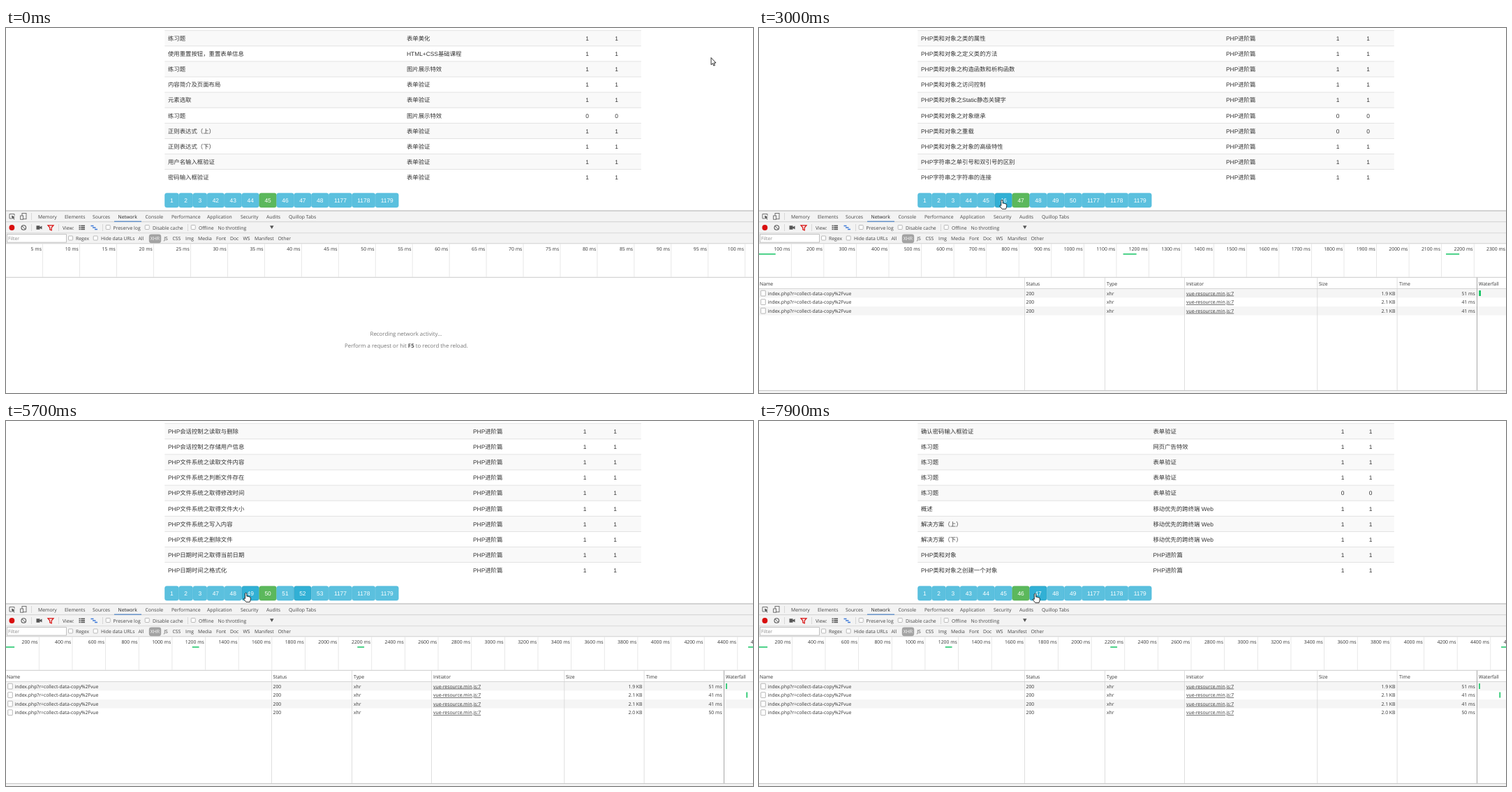
These frames come from a looping animation (1070 by 523 pixels, 8 s). An HTML page:

```html
<!DOCTYPE html>
<html lang="zh-CN">
<head>
<meta charset="utf-8">
<title>Pagination with cached requests</title>
<style>
html, body { margin: 0; width: 100%; height: 100%; overflow: hidden; background: #fff; }
svg { display: block; width: 1070px; height: 523px; text-rendering: geometricPrecision; }
.page { font: 8.4px "Liberation Sans", "Noto Sans CJK SC", "Noto Sans CJK", sans-serif; fill: #333; }
.tools { font: 6.85px "Open Sans", "Noto Sans", sans-serif; fill: #333; }
.mid { text-anchor: middle; }
.end { text-anchor: end; }
.hint { font-size: 7.9px; fill: #777; }
</style>
</head>
<body>
<svg id="stage" viewBox="0 0 1070 523" xmlns="http://www.w3.org/2000/svg"></svg>
<script>
const LOOP = 8000, TICK = 100;
const stage = document.getElementById('stage');

function el(parent, tag, attrs = {}, text) {
  const node = document.createElementNS('http://www.w3.org/2000/svg', tag);
  for (const key in attrs) node.setAttribute(key, attrs[key]);
  if (text !== undefined) node.textContent = text;
  parent.appendChild(node);
  return node;
}
const group = (parent, cls = '') => el(parent, 'g', { class: cls });
const rect = (g, x, y, width, height, fill, more) => el(g, 'rect', { x, y, width, height, fill, ...more });
const label = (g, x, y, text, more) => el(g, 'text', { x, y, ...more }, text);
const path = (g, d, more) => el(g, 'path', { d, fill: 'none', ...more });
const show = (node, on) => node.setAttribute('display', on ? 'inline' : 'none');

// Course list
const same = (text, n = 10) => Array(n).fill(text).join('|');
const PHP = { cols: [669, 829, 872.5], cats: same('PHP进阶篇') };
const strings = { ...PHP, zero: [],
  titles: 'PHP字符串之去除字符串首尾的空格|PHP字符串之获取字符串的长度|PHP字符串之字符串的截取|PHP字符串之查找字符串|PHP字符串之替换字符串|PHP字符串之格式化字符串|PHP字符串之字符串的合并与分割|PHP字符串之字符串的转义|什么叫正则表达式|正则表达式的基本语法' };
const PAGES = {
  45: { cols: [574, 832.5, 874.5], zero: [5],
    titles: '练习题|使用重置按钮，重置表单信息|练习题|内容简介及页面布局|元素选取|练习题|正则表达式（上）|正则表达式（下）|用户名输入框验证|密码输入框验证',
    cats: '表单美化|HTML+CSS基础课程|图片展示特效|表单验证|表单验证|图片展示特效|' + same('表单验证', 4) },
  46: { cols: [564.5, 836, 876], zero: [4],
    titles: '确认密码输入框验证|练习题|练习题|练习题|练习题|概述|解决方案（上）|解决方案（下）|PHP类和对象|PHP类和对象之创建一个对象',
    cats: '表单验证|网页广告特效|' + same('表单验证', 3) + '|' + same('移动优先的跨终端 Web', 3) + '|' + same('PHP进阶篇', 2) },
  47: { ...PHP, zero: [5, 6],
    titles: 'PHP类和对象之类的属性|PHP类和对象之定义类的方法|PHP类和对象之构造函数和析构函数|PHP类和对象之访问控制|PHP类和对象之Static静态关键字|PHP类和对象之对象继承|PHP类和对象之重载|PHP类和对象之对象的高级特性|PHP字符串之单引号和双引号的区别|PHP字符串之字符串的连接' },
  48: strings,
  50: { ...PHP, zero: [],
    titles: 'PHP会话控制之读取与删除|PHP会话控制之存储用户信息|PHP文件系统之读取文件内容|PHP文件系统之判断文件存在|PHP文件系统之取得修改时间|PHP文件系统之取得文件大小|PHP文件系统之写入内容|PHP文件系统之删除文件|PHP日期时间之取得当前日期|PHP日期时间之格式化' },
};
const ROW = 22.1;
const list = group(stage, 'page');
for (let i = 0; i < 10; i++) {
  const y = 3.6 + i * ROW;
  if (i % 2 === 0) rect(list, 227.3, y, 682.5, ROW, '#f9f9f9');
  rect(list, 227.3, y - .3, 682.5, .8, '#ddd');
}
const pageViews = {};
for (const id in PAGES) {
  const { cols, titles, cats, zero } = PAGES[id], g = pageViews[id] = group(list);
  const kinds = cats.split('|');
  titles.split('|').forEach((title, i) => {
    const y = 18 + i * ROW, count = zero.includes(i) ? 0 : 1;
    label(g, 232, y, title);
    label(g, cols[0], y, kinds[i]);
    label(g, cols[1], y, count, { class: 'mid' });
    label(g, cols[2], y, count, { class: 'mid' });
  });
}

// Pagination buttons
const buttons = [];
for (let i = 0, x = 227.3; i < 13; i++) {
  const w = i < 3 ? 20.2 : i < 10 ? 24.9 : 33.4;
  buttons.push({
    x, w,
    box: rect(list, x + .3, 236.8, w - .6, 20.2, '', { rx: 2.4, 'stroke-width': .6 }),
    text: label(list, x + w / 2, 250, '', { class: 'mid', fill: '#fff' }),
  });
  x += w;
}
const SKIN = {
  plain: ['#5bc0de', '#46b8da'], hover: ['#31b0d5', '#269abc'], press: ['#2795bf', '#1b6d85'],
  current: ['#5cb85c', '#4cae4c'], currentHover: ['#449d44', '#398439'],
};
function paintButtons(page, focus, pressed, hover) {
  const names = [1, 2, 3];
  for (let n = page - 3; n <= page + 3; n++) names.push(n);
  names.push(1177, 1178, 1179);
  buttons.forEach((b, i) => {
    const lit = i === hover || i === focus;
    const skin = i === 6 ? (i === hover ? 'currentHover' : 'current')
      : pressed && i === focus ? 'press' : lit ? 'hover' : 'plain';
    b.box.setAttribute('fill', SKIN[skin][0]);
    b.box.setAttribute('stroke', SKIN[skin][1]);
    b.text.textContent = names[i];
  });
}

// Developer tools frame
const tools = group(stage, 'tools');
rect(tools, 0, 261.5, 1070, 47.5, '#f3f3f3');
[[261.5, '#a8a8a8'], [277.3, '#ccc'], [293.3, '#d4d4d4'], [308.4, '#ccc'], [356.8, '#c4c4c4']]
  .forEach(([y, c]) => rect(tools, 0, y, 1070, .9, c));
rect(tools, 155, 276.6, 39, 1.2, '#4a80c4');
const texts = (y, items) => items.forEach(([x, s, fill = '#444']) => label(tools, x, y, s, { fill }));
texts(272.6, [[46, 'Memory'], [84, 'Elements'], [124, 'Sources'], [160.5, 'Network', '#222'], [199.5, 'Console'],
  [237, 'Performance'], [288, 'Application'], [336, 'Security'], [373, 'Audits'], [405, 'Quillop Tabs']]);
texts(288.6, [[81, 'View:'], [153.5, 'Preserve log'], [210, 'Disable cache'], [276, 'Offline'], [303.5, 'No throttling']]);
rect(tools, 1.4, 295.7, 85, 11.4, '#fff', { stroke: '#aaa', 'stroke-width': .7 });
rect(tools, 204.8, 295.4, 17.4, 12.8, '#a3a3a3', { rx: 3.4 });
texts(304.4, [[3, 'Filter', '#888'], [100, 'Regex'], [136, 'Hide data URLs'], [189.5, 'All'], [206.8, 'XHR', '#fff'],
  [226.3, 'JS'], [238.5, 'CSS'], [257, 'Img'], [275, 'Media'], [301, 'Font'], [321, 'Doc'], [339.5, 'WS'],
  [356, 'Manifest'], [389.5, 'Other']]);
[[36, 265], [36, 281], [75, 281], [138, 281], [260, 281]].forEach(([x, y]) => rect(tools, x, y, .7, 10, '#ccc'));
[[143.2, 282.5], [199.2, 282.5], [265.2, 282.5], [89.6, 298], [125.2, 298]].forEach(([x, y]) =>
  rect(tools, x, y, 6, 6, '#fff', { stroke: '#a0a0a0', 'stroke-width': .7, rx: .8 }));

// Toolbar icons
path(tools, 'M8 273H5V266.500H12V269', { stroke: '#666', 'stroke-width': .9 });
path(tools, 'M8 268.500L13 271L10.800 271.700L12.500 274L11.500 274.500L10 272.400L8.800 274Z', { fill: '#555' });
rect(tools, 23, 265.5, 6, 8.2, 'none', { stroke: '#666', 'stroke-width': .9 });
rect(tools, 20.6, 269, 4, 5.2, '#f3f3f3', { stroke: '#666', 'stroke-width': .9 });
el(tools, 'circle', { cx: 8.4, cy: 286, r: 3.9, fill: '#d90d0d' });
el(tools, 'circle', { cx: 25.3, cy: 286, r: 3.3, fill: 'none', stroke: '#555', 'stroke-width': 1.1 });
path(tools, 'M23.200 283.900L27.400 288.100', { stroke: '#555' });
path(tools, 'M43.500 283.300H48.500V285.200L51.500 283.400V288.600L48.500 286.800V288.700H43.500Z', { fill: '#555' });
path(tools, 'M60 282.800H68L65.200 286V289.800L62.800 288.800V286Z', { stroke: '#d90d0d', 'stroke-width': 1.2 });
for (let i = 0; i < 3; i++) {
  rect(tools, 104.5, 282.6 + i * 2.5, 2, 1.6, '#555');
  rect(tools, 107.3, 282.6 + i * 2.5, 5.7, 1.6, '#555');
}
path(tools, 'M121.500 283.500H125.500M124 286H128.500M127 288.600H131', { stroke: '#3b78d8', 'stroke-width': 1.5 });
path(tools, 'M378 283.200H383.500L380.750 288Z', { fill: '#555' });

// Network panel, one view per number of finished requests
const SCALES = [[5, 52.95], [5, 52.95], [50, 45.46], [100, 46.57], [200, 47.64]];
const CALLS = [[0, 51, '1.9 KB'], [1120, 41, '2.1 KB'], [2113, 41, '2.1 KB'], [4463, 50, '2.0 KB']];
const GREEN = '#16c464', CALL_H = 12.55;
const netViews = SCALES.map(([step, gap], n) => {
  const g = group(tools), calls = CALLS.slice(0, n);
  for (let i = 1; i * gap < 1110; i++) {
    rect(g, i * gap - .7, 309.3, .8, 47.5, '#e2e2e2');
    label(g, i * gap - 2, 319.2, i * step + ' ms', { class: 'end' });
  }
  calls.forEach(([at, took]) => rect(g, at * gap / step, 323.2, took * gap / step, 1.5, GREEN));
  if (!n) {
    label(g, 573, 441, 'Recording network activity...', { class: 'mid hint' });
    const hint = label(g, 573.5, 457.8, 'Perform a request or hit ', { class: 'mid hint' });
    el(hint, 'tspan', { 'font-weight': 700, fill: '#555' }, 'F5');
    el(hint, 'tspan', {}, ' to record the reload.');
    return g;
  }
  const total = CALLS[n - 1][0] + CALLS[n - 1][1], rate = 118 / total;
  calls.forEach(([at, took, size], i) => {
    const y = 373.9 + i * CALL_H, base = y + 8.7;
    if (i % 2 === 0) rect(g, 0, y, 1070, CALL_H, '#f5f5f5');
    rect(g, 2.7, y + 2.3, 6.6, 7.8, '#fff', { stroke: '#999', 'stroke-width': .7, rx: .6 });
    label(g, 12.5, base, 'index.php?r=collect-data-copy%2Fvue');
    label(g, 382.5, base, '200');
    label(g, 498, base, 'xhr');
    label(g, 612, base, 'vue-resource.min.js:7', { 'text-decoration': 'underline' });
    label(g, 911.5, base, size, { class: 'end' });
    label(g, 1025.7, base, took + ' ms', { class: 'end' });
    rect(g, 1031.2 + at * rate, y + 2.1, Math.max(1.6, took * rate), 8, GREEN);
  });
  [[1, 'Name'], [382.5, 'Status'], [498, 'Type'], [612, 'Initiator'], [802, 'Size'], [917, 'Time'], [1031, 'Waterfall']]
    .forEach(([x, s]) => label(g, x, 368.5, s));
  rect(g, 0, 373.2, 1070, .8, '#ccc');
  [380, 495, 609.3, 799.5, 913.7].forEach(x => rect(g, x, 357.5, .7, 162, '#d0d0d0'));
  rect(g, 1028, 357.5, 1, 162, '#a8a8a8');
  rect(g, 0, 519.3, 1070, 3.7, '#f3f3f3');
  rect(g, 0, 519.2, 1070, .8, '#bbb');
  return g;
});

// Pointers
const ink = { fill: '#fff', stroke: '#000', 'stroke-width': .8, 'stroke-linejoin': 'round' };
const arrow = path(stage, 'M0 0V10.200L2.300 8.100L3.800 11.600L5.400 10.900L3.900 7.500H6.900Z', ink);
const hand = path(stage, 'M-1.200 8.500V1Q0 -.6 1.200 1V5.200Q2.600 4.600 3.300 5.600Q4.600 5 5.200 6.200Q6.600 5.800 6.700 7.400V9.800L5.600 13.400H.2L-3.400 8.800Q-3.200 7.400 -1.200 8.500Z', ink);

// Clicks: press time, button, page opened, requests finished
const CLICKS = [[-TICK, -1, 45, 0], [1000, 7, 46, 1], [2000, 8, 48, 2], [2900, 5, 47, 3], [4100, 7, 48, 3],
  [5100, 8, 50, 4], [6000, 4, 48, 4], [6600, 3, 45, 4], [7800, 7, 46, 4]];
// Pointer path: time, x, y
const TRACK = [[0, 1010, 42.5], [900, 402, 246], [1500, 402, 246], [1800, 423, 246], [2000, 421.5, 246],
  [2200, 421.5, 246], [2800, 348, 246], [3200, 348, 246], [3700, 389.5, 246], [4400, 389.5, 246],
  [4900, 417, 246], [5300, 417, 246], [5900, 318, 246], [6200, 313.5, 245.5], [6400, 313.5, 245.5],
  [6600, 302, 246], [6900, 302, 246], [7600, 395.5, 247], [LOOP, 395.5, 247]];

function pointerAt(t) {
  const i = TRACK.findIndex(([at]) => at > t);
  const [t0, x0, y0] = TRACK[i - 1], [t1, x1, y1] = TRACK[i];
  const k = (t - t0) / (t1 - t0), e = k * k * (3 - 2 * k);
  return [x0 + (x1 - x0) * e, y0 + (y1 - y0) * e];
}

function render(now) {
  const t = Math.floor(now % LOOP / TICK) * TICK;
  const n = CLICKS.filter(([at]) => at <= t).length - 1;
  const [at, focus] = CLICKS[n], pressed = t - at < TICK;
  const [, , page, done] = CLICKS[pressed ? n - 1 : n];
  const [x, y] = pointerAt(t);
  const hover = y > 236 && y < 258 ? buttons.findIndex(b => x >= b.x && x < b.x + b.w) : -1;

  for (const id in pageViews) show(pageViews[id], +id === page);
  netViews.forEach((view, i) => show(view, i === done));
  paintButtons(page, focus, pressed, hover);
  show(hand, hover >= 0);
  show(arrow, hover < 0);
  (hover < 0 ? arrow : hand).setAttribute('transform', `translate(${x} ${y})`);
}

function frame() {
  render(performance.now());
  requestAnimationFrame(frame);
}
frame();
</script>
</body>
</html>
```
